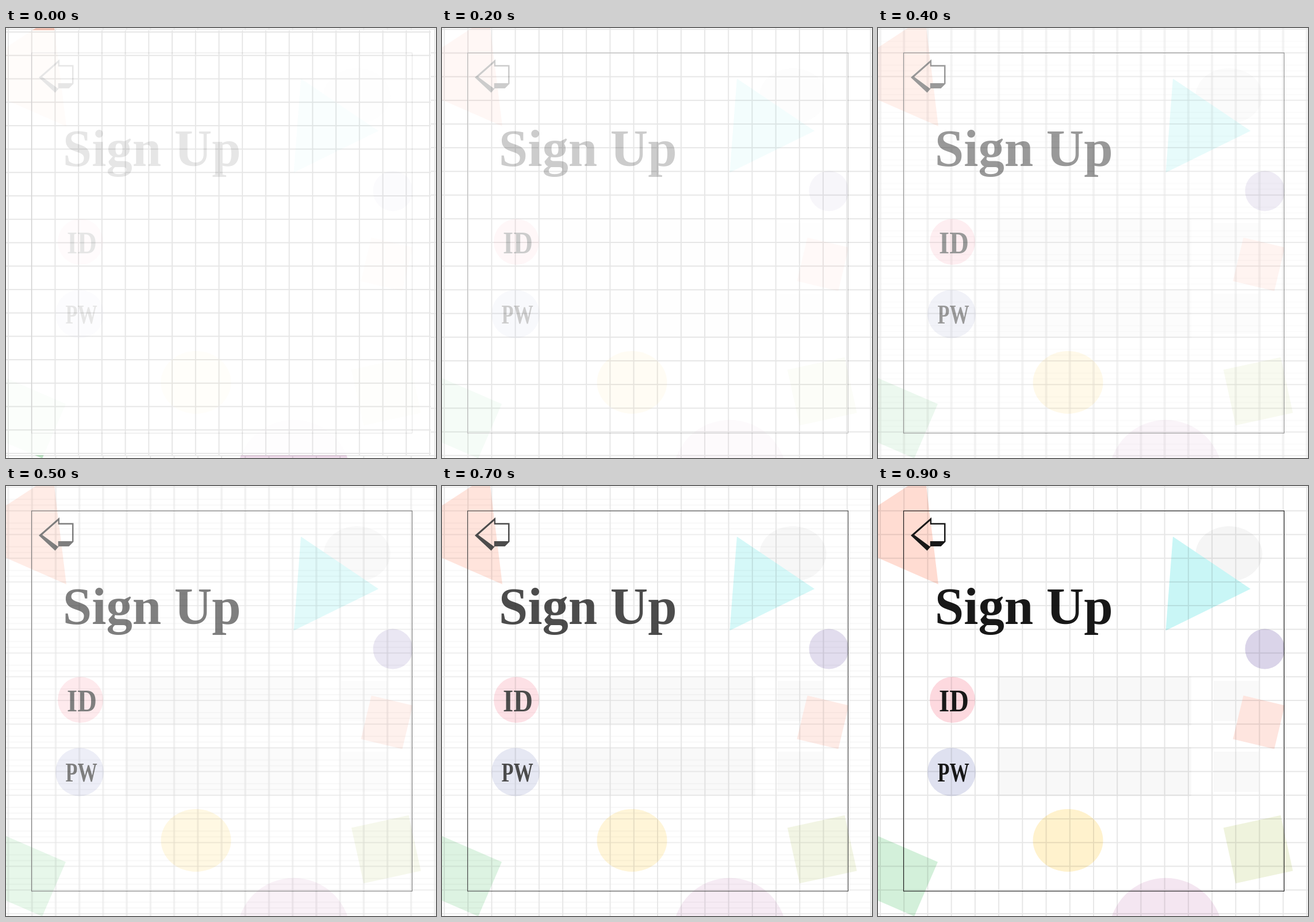
These frames come from a looping animation (748x748 px, 1 s). An HTML page with a canvas:

```html
<!DOCTYPE html>
<html lang="en">
<head>
<meta charset="utf-8">
<title>Sign Up</title>
<style>
  html, body { margin: 0; width: 100%; height: 100%; overflow: hidden; background: #fff; }
  canvas { display: block; width: 748px; height: 748px; }
</style>
</head>
<body>
<canvas id="stage" width="748" height="748"></canvas>
<script>
const SIZE = 748, STEP = 100, COUNT = 10, LAST = COUNT - 1;
const INK = '#181818', LINE = '#e7e7e7';
const stage = document.getElementById('stage').getContext('2d');

// The form is painted once on its own layer and faded in as a whole
const layer = document.createElement('canvas');
layer.width = layer.height = SIZE;
const pen = layer.getContext('2d');

function poly(color, ...pts) {
  pen.fillStyle = color;
  pen.beginPath();
  for (let i = 0; i < pts.length; i += 2) pen.lineTo(pts[i], pts[i + 1]);
  pen.fill();
}

function oval(color, x, y, rx, ry = rx) {
  pen.fillStyle = color;
  pen.beginPath();
  pen.ellipse(x, y, rx, ry, 0, 0, Math.PI * 2);
  pen.fill();
}

function tile(color, x, y, w, h, deg = 0) {
  pen.save();
  pen.translate(x, y);
  pen.rotate(deg * Math.PI / 180);
  pen.fillStyle = color;
  pen.fillRect(-w / 2, -h / 2, w, h);
  pen.restore();
}

function label(str, x, y, size, narrow) {
  pen.save();
  pen.translate(x, y);
  pen.scale(narrow, 1);
  pen.font = `bold ${size}px "Liberation Serif", "Times New Roman", serif`;
  pen.fillStyle = INK;
  pen.fillText(str, 0, 0);
  pen.restore();
}

function arrow() {
  const body = new Path2D('M57 86 93 54.5V64.5H117.5V97L109.5 105H92L85.5 112.5Z');
  body.addPath(new Path2D('M63 85 90.7 60.5V67H115V96H90.7V105.5Z'));
  pen.fillStyle = INK;
  pen.fill(body, 'evenodd');
}

function paintForm() {
  for (const y of [374, 497]) {
    tile('#f8f8f8', 376, y, 338, 85);
    tile('#f9f9f9', 623, y, 79, 70);
  }
  poly('#ffdcd2', 0, 34, 52, 0, 84, 0, 105, 171, 0, 125);
  oval('#f5f5f5', 610.5, 118, 58, 48);
  poly('#c9f6f6', 513, 88, 648, 179, 500.5, 251.5);
  oval('#dad4e9', 673, 283.5, 34.5, 35);
  tile('#fee5df', 662.5, 411, 74, 78, 13.5);
  oval('#fff2cd', 330.5, 616.5, 61, 54.5);
  tile('#eff3dd', 661.3, 632, 102, 99, -12.4);
  tile('#d3f0da', 28.5, 677.5, 120, 103, 23.4);
  oval('#f4e6f1', 500.5, 781, 99.2);
  oval('#fdd9df', 129.5, 372, 39.5, 40);
  oval('#dfe1f0', 128, 497.5, 42);

  pen.strokeStyle = INK;
  pen.lineWidth = 1.1;
  pen.strokeRect(44.5, 43.3, 662, 661.5);

  arrow();
  label('Sign Up', 98.8, 239.5, 92, 0.985);
  label('ID', 106, 391.5, 54.5, 0.855);
  label('PW', 103.5, 513.5, 46, 0.745);
}

function drawForm(alpha) {
  stage.globalCompositeOperation = 'multiply';
  stage.globalAlpha = alpha;
  stage.drawImage(layer, 0, 0);
  stage.globalCompositeOperation = 'source-over';
  stage.globalAlpha = 1;
}

// Half a sine wave between two steps, zero elsewhere
const bump = (k, from, to) =>
  k > from && k < to ? Math.sin(Math.PI * (k - from) / (to - from)) : 0;

function band(x, y, w, h, alpha = 1) {
  stage.globalAlpha = alpha;
  stage.fillRect(x, y, w, h);
  stage.globalAlpha = 1;
}

// The sheet starts a little small and low, then settles
function drawGrid(k) {
  const off = k < LAST ? Math.exp(-1.4 * k) : 0;
  const pitch = 41.22 - 0.5 * off;
  const thick = 2 + 2 * bump(k, 2, 6);
  const echo = 0.35 * bump(k, 3, LAST);

  stage.save();
  stage.beginPath();
  stage.rect(0, 4 * off, SIZE - 9 * off, SIZE - 9 * off);
  stage.clip();
  stage.fillStyle = '#fff';
  band(0, 0, SIZE, SIZE);
  stage.fillStyle = LINE;
  for (let i = 0; i < 20; i++) {
    const x = 4 + i * pitch, y = 2 + 5 * off + i * pitch;
    band(x - thick / 2, 0, thick, SIZE, 2 / thick);
    band(0, y - 1, SIZE, 2, 1 - echo);
    for (const lift of [10, 20]) band(0, y - lift - 1, SIZE, 2, echo);
  }
  stage.restore();
}

function draw(k) {
  // The finished form still shows beyond the edges of the smaller sheet
  drawGrid(LAST);
  drawForm(1);
  drawForm(0.4);
  drawGrid(k);
  drawForm(Math.max(1, k) / LAST);
}

paintForm();
let shown = -1;
const start = performance.now();
function tick() {
  const k = Math.floor((performance.now() - start) / STEP) % COUNT;
  if (k !== shown) draw(shown = k);
  requestAnimationFrame(tick);
}
tick();
</script>
</body>
</html>
```
